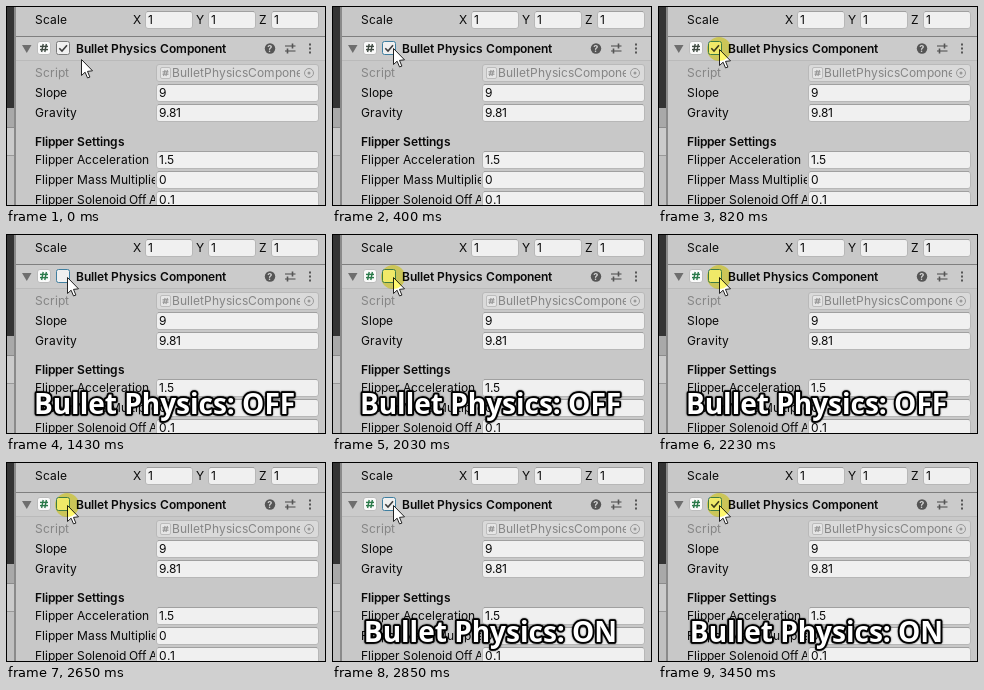
Animation, 320 px wide and 200 px high, one loop 4070 ms. Source, as an HTML page with a canvas:

```html
<!DOCTYPE html>
<html lang="en">
<head>
<meta charset="utf-8">
<title>Inspector toggle</title>
<style>
html, body { margin: 0; width: 100%; height: 100%; overflow: hidden; background: #c8c8c8; }
canvas { display: block; width: 320px; height: 200px; }
</style>
</head>
<body>
<canvas id="stage" width="320" height="200"></canvas>
<script>
const ctx = document.getElementById('stage').getContext('2d');
const LOOP = 4070;
const UI = 'Inter, Roboto, sans-serif';
const INK = '#090909';

function rect(x, y, w, h, color) {
  ctx.fillStyle = color;
  ctx.fillRect(x, y, w, h);
}

function disc(x, y, r, color) {
  ctx.fillStyle = color;
  ctx.beginPath();
  ctx.arc(x, y, r, 0, Math.PI * 2);
  ctx.fill();
}

function box(x, y, w, h, fill, border, radius = 2.5) {
  ctx.beginPath();
  ctx.roundRect(x + 0.5, y + 0.5, w - 1, h - 1, radius);
  ctx.fillStyle = fill;
  ctx.fill();
  ctx.lineWidth = 1;
  ctx.strokeStyle = border;
  ctx.stroke();
}

function path(points, color, width) {
  ctx.beginPath();
  points.forEach(([x, y], i) => i ? ctx.lineTo(x, y) : ctx.moveTo(x, y));
  ctx.strokeStyle = color;
  ctx.lineWidth = width;
  ctx.stroke();
}

// Editor text advances by whole pixels.
function text(str, x, y, { color = INK, weight = 400, size = 12, right = 320 } = {}) {
  ctx.save();
  ctx.beginPath();
  ctx.rect(0, 0, right, 200);
  ctx.clip();
  ctx.font = `${weight} ${size}px ${UI}`;
  ctx.textAlign = 'left';
  ctx.fillStyle = color;
  for (const ch of str) {
    ctx.fillText(ch, x, y);
    x += Math.round(ctx.measureText(ch).width);
  }
  ctx.restore();
}

function field(x, y, w, value) {
  box(x, y, w, 18, '#f0f0f0', '#b7b7b7');
  rect(x + 2, y, w - 4, 1, '#a0a0a0');
  text(value, x + 3, y + 13);
}

function row(label, value, y) {
  text(label, 29, y + 13, { right: 149 });
  field(150, y, 163, value);
}

function hash(x, y, s, color, width = 1.2) {
  for (const d of [0.3, 0.7]) {
    path([[x + s * d + 0.8, y], [x + s * d - 0.8, y + s]], color, width);
    path([[x, y + s * d], [x + s, y + s * d]], color, width);
  }
}

function backdrop() {
  rect(0, 0, 320, 200, '#c8c8c8');
  rect(0, 0, 8, 102, '#343434');
  rect(0, 102, 8, 19, '#a9a9a9');
  rect(0, 121, 8, 1, '#8c8c8c');
  rect(0, 122, 8, 27, '#cbcbcb');
  rect(0, 149, 8, 1, '#999');
  rect(0, 150, 8, 50, '#c0c0c0');
  rect(8, 0, 2, 200, '#8a8a8a');
  rect(10, 30, 310, 1, '#7f7f7f');
  rect(10, 31, 310, 24, '#cbcbcb');
  rect(10, 54, 310, 1, '#bababa');
}

function headerIcons() {
  ctx.fillStyle = '#6e6e6e';
  ctx.beginPath();
  ctx.moveTo(16, 39);
  ctx.lineTo(25.5, 39);
  ctx.lineTo(20.75, 47);
  ctx.fill();

  disc(264, 42.5, 5.2, '#555');
  text('?', 261.3, 46, { color: '#d8d8d8', weight: 700, size: 9 });

  for (const [y, knob] of [[40, 286.5], [45, 281.5]]) {
    path([[279, y], [289.5, y]], '#555', 1.1);
    path([[knob, y - 2.5], [knob, y + 2.5]], '#555', 1.6);
  }
  for (const y of [38, 42, 46]) rect(303, y - 0.5, 2, 2, '#555');
}

function inspector(s) {
  backdrop();
  text('Scale', 29, 18);
  [['X', 127, 139], ['Y', 190, 202], ['Z', 253, 265]].forEach(([axis, lx, fx]) => {
    text(axis, lx, 18);
    field(fx, 5, 48, '1');
  });

  headerIcons();
  box(31, 35, 14, 14, '#fafafa', '#bdbdbd');
  hash(34, 38, 8, s.toggled ? '#2a7a4a' : '#3f4a42', 1.4);
  box(50, 35, 14, 14, '#f0f0f0', s.hover ? '#3f7fa0' : '#7a7a7a', 2);
  if (s.checked) path([[53.3, 42.3], [56, 45], [61, 39.3]], '#3c3c3c', 1.6);
  text('Bullet Physics Component', 70, 47, { weight: 600 });

  text('Script', 29, 71, { color: '#858585' });
  box(150, 58, 163, 18, '#dadada', '#b9b9b9');
  box(154, 61, 11, 12, '#e6e6e6', '#bcbcbc', 1.5);
  hash(156.5, 64, 6, '#9a9a9a');
  text('BulletPhysicsComponent', 166, 71, { color: '#858585', right: 294 });
  ctx.beginPath();
  ctx.arc(303, 67, 4.5, 0, Math.PI * 2);
  ctx.strokeStyle = '#999';
  ctx.lineWidth = 1;
  ctx.stroke();
  disc(303, 67, 1.5, '#999');

  row('Slope', '9', 78);
  row('Gravity', '9.81', 98);
  text('Flipper Settings', 29, 140, { weight: 600 });
  row('Flipper Acceleration', '1.5', 145);
  row('Flipper Mass Multiplier', '0', 165);
  row('Flipper Solenoid Off Accel', '0.1', 185);
}

function pointer(x, y) {
  const shape = [[0, 0], [0, 16], [3.6, 12.7], [6, 18.4], [8.4, 17.6], [6, 11.9], [11, 11.3]];
  ctx.beginPath();
  shape.forEach(([dx, dy]) => ctx.lineTo(x + dx + 0.5, y + dy + 0.5));
  ctx.closePath();
  ctx.fillStyle = '#fff';
  ctx.fill();
  ctx.strokeStyle = '#222';
  ctx.lineWidth = 1;
  ctx.stroke();
}

function highlight() {
  ctx.globalCompositeOperation = 'multiply';
  disc(61, 43, 12, '#fff86e');
  ctx.globalCompositeOperation = 'source-over';
}

function caption(str) {
  ctx.save();
  ctx.font = '700 28px "Open Sans", "Noto Sans", sans-serif';
  ctx.textAlign = 'center';
  ctx.lineJoin = 'round';
  ctx.lineWidth = 3.6;
  ctx.strokeStyle = '#000';
  ctx.shadowColor = '#000';
  ctx.shadowBlur = 1.5;
  ctx.strokeText(str, 158.5, 180);
  ctx.shadowBlur = 0;
  ctx.fillStyle = '#fff';
  ctx.fillText(str, 158.5, 180);
  ctx.restore();
}

function frame() {
  ctx.strokeStyle = '#000';
  ctx.lineWidth = 1;
  ctx.strokeRect(0.5, 0.5, 319, 199);
}

function stateAt(t) {
  const within = (a, b) => t >= a && t < b;
  return {
    cursor: t < 220 ? [75, 53] : t < 400 ? [65, 47] : t < 620 ? [61, 42] : [61, 43],
    hover: t >= 400,
    toggled: t >= 1430,
    checked: !within(1430, 2850),
    pressed: within(620, 1430) || within(2030, 2850) || t >= 3450,
    caption: within(1430, 2650) ? 'OFF' : t >= 2850 ? 'ON' : ''
  };
}

function draw(now) {
  const s = stateAt(now % LOOP);
  inspector(s);
  pointer(...s.cursor);
  if (s.pressed) highlight();
  if (s.caption) caption('Bullet Physics: ' + s.caption);
  frame();
}

const start = performance.now();
function tick() {
  draw(performance.now() - start);
  requestAnimationFrame(tick);
}
tick();
</script>
</body>
</html>
```
